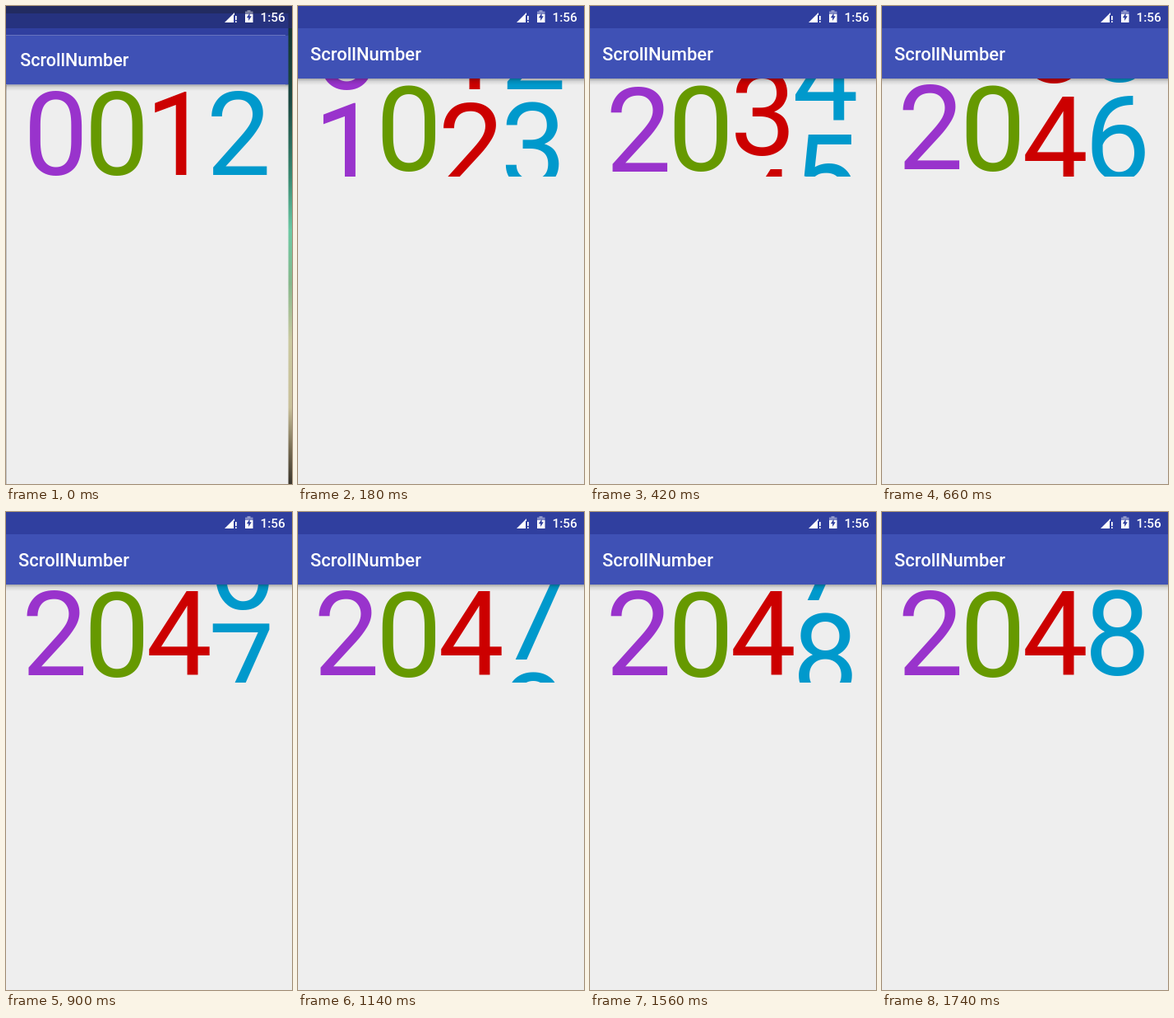
Recreate the animation shown at these times as an HTML page with a canvas. Size 348 by 580 pixels, loop 2820 ms.

```html
<!DOCTYPE html>
<html lang="en">
<head>
<meta charset="utf-8">
<title>ScrollNumber</title>
<style>
  html, body { margin: 0; width: 100%; height: 100%; overflow: hidden; background: #eee; }
  canvas { display: block; width: 348px; height: 580px; }
</style>
</head>
<body>
<canvas id="stage" width="348" height="580"></canvas>
<script>
const ctx = document.getElementById('stage').getContext('2d');
const WIDTH = 348, HEIGHT = 580, LOOP = 2820, TICK = 60;
const BAR_TOP = 27, BAR_BOTTOM = 88, REEL_HEIGHT = 119;
const REELS = [
  { from: 0, to: 2, color: '#9933cc' },
  { from: 0, to: 0, color: '#669900' },
  { from: 1, to: 4, color: '#cc0000' },
  { from: 2, to: 8, color: '#0099cc' },
];
// [time in ms, screen refreshes so far]
const REFRESHES = [[90, 0], [180, 5], [420, 18], [660, 32], [900, 47], [1380, 75], [1740, 95]];

function rect(color, x, y, w, h) {
  ctx.fillStyle = color;
  ctx.fillRect(x, y, w, h);
}

function polygon(color, ...points) {
  ctx.fillStyle = color;
  ctx.beginPath();
  points.forEach(([x, y]) => ctx.lineTo(x, y));
  ctx.fill();
}

function text(value, x, y, font, color, align = 'left') {
  ctx.font = font + ' Roboto, sans-serif';
  ctx.fillStyle = color;
  ctx.textAlign = align;
  ctx.fillText(value, x, y);
}

function verticalGradient(y0, y1, ...stops) {
  const gradient = ctx.createLinearGradient(0, y0, 0, y1);
  stops.forEach(([at, color]) => gradient.addColorStop(at, color));
  return gradient;
}

function refreshCount(time) {
  const next = REFRESHES.findIndex(([t]) => t > time);
  if (next === 0) return 0;
  if (next < 0) return REFRESHES.at(-1)[1];
  const [t0, n0] = REFRESHES[next - 1], [t1, n1] = REFRESHES[next];
  return Math.round(n0 + (n1 - n0) * (time - t0) / (t1 - t0));
}

// Each digit passes at constant speed; speed eases down from digit to digit.
function reelState({ from, to }, refreshes) {
  let number = from, offset = 0, active = from !== to;
  for (let i = 0; i < refreshes && active; i++) {
    active = number !== to;
    const progress = (number - from) / (to - from);
    const eased = (1 - Math.cos(Math.PI * progress)) / 2;
    offset += 0.15 * (1.1 - eased);
    if (offset >= 1) {
      offset = 0;
      number++;
    }
  }
  return { number, offset };
}

function drawReels(refreshes) {
  ctx.save();
  ctx.beginPath();
  ctx.rect(0, BAR_BOTTOM, WIDTH, REEL_HEIGHT);
  ctx.clip();
  REELS.forEach((reel, i) => {
    const { number, offset } = reelState(reel, refreshes);
    const x = 59.3 + 75.7 * i, y = 199.5 - offset * REEL_HEIGHT;
    text(number, x, y, '143px', reel.color, 'center');
    text((number + 1) % 10, x, y + REEL_HEIGHT, '143px', reel.color, 'center');
  });
  ctx.restore();
}

function drawWindow(refreshes) {
  rect('#eeeeee', -5, BAR_BOTTOM, WIDTH + 5, HEIGHT);
  drawReels(refreshes);
  const shadow = verticalGradient(BAR_BOTTOM, BAR_BOTTOM + 8,
    [0, 'rgba(0,0,0,.3)'], [0.4, 'rgba(0,0,0,.11)'], [1, 'rgba(0,0,0,0)']);
  rect(shadow, -5, BAR_BOTTOM, WIDTH + 5, 8);
  rect('#303f9f', -5, 0, WIDTH + 5, BAR_TOP);
  rect('#3f51b5', -5, BAR_TOP, WIDTH + 5, BAR_BOTTOM - BAR_TOP);
  text('ScrollNumber', 15, 65.8, '500 22px', '#fff');
}

function drawStatusIcons() {
  polygon('#fff', [266, 20], [278, 8], [278, 20]);
  rect('#303f9f', 277, 11, 3, 9);
  rect('#fff', 279, 12, 1.7, 5);
  rect('#fff', 279, 18.3, 1.7, 1.7);
  rect('rgba(255,255,255,.4)', 293.5, 5, 4, 2);
  rect('rgba(255,255,255,.4)', 291, 6.5, 9.5, 3.5);
  rect('#fff', 291, 10, 9.5, 10);
  polygon('#303f9f', [296.6, 8.5], [292.8, 14.3], [295.1, 14.3], [295.1, 18], [298.8, 12.3], [296.6, 12.3]);
  text('1:56', 339.8, 19, '500 15.4px', '#fff', 'right');
}

// The window is still growing into place over the wallpaper.
function drawOpening() {
  rect('#2a3678', 0, 0, WIDTH, BAR_TOP);
  rect(verticalGradient(0, HEIGHT, [0, '#10302f'], [0.2, '#1c4a42'], [0.36, '#398a72'],
    [0.47, '#6cc9a4'], [0.58, '#86b88c'], [0.7, '#cbc9a0'], [0.84, '#c9c09a'],
    [0.93, '#73684f'], [1, '#3a352c']), 340, BAR_TOP, 8, HEIGHT);
  ctx.save();
  ctx.translate(2.5, 9);
  ctx.scale(0.98, 0.98);
  drawWindow(0);
  ctx.restore();
  rect('rgba(0,0,0,.2)', 0, 96, 1, HEIGHT);
  rect('rgba(0,0,0,.2)', 0, 0, WIDTH, BAR_TOP);
}

function frame(now) {
  const time = Math.floor(now % LOOP / TICK) * TICK;
  ctx.clearRect(0, 0, WIDTH, HEIGHT);
  if (time < TICK) drawOpening();
  else drawWindow(refreshCount(time));
  drawStatusIcons();
  requestAnimationFrame(() => frame(performance.now() - start));
}

const start = performance.now();
frame(0);
</script>
</body>
</html>
```
